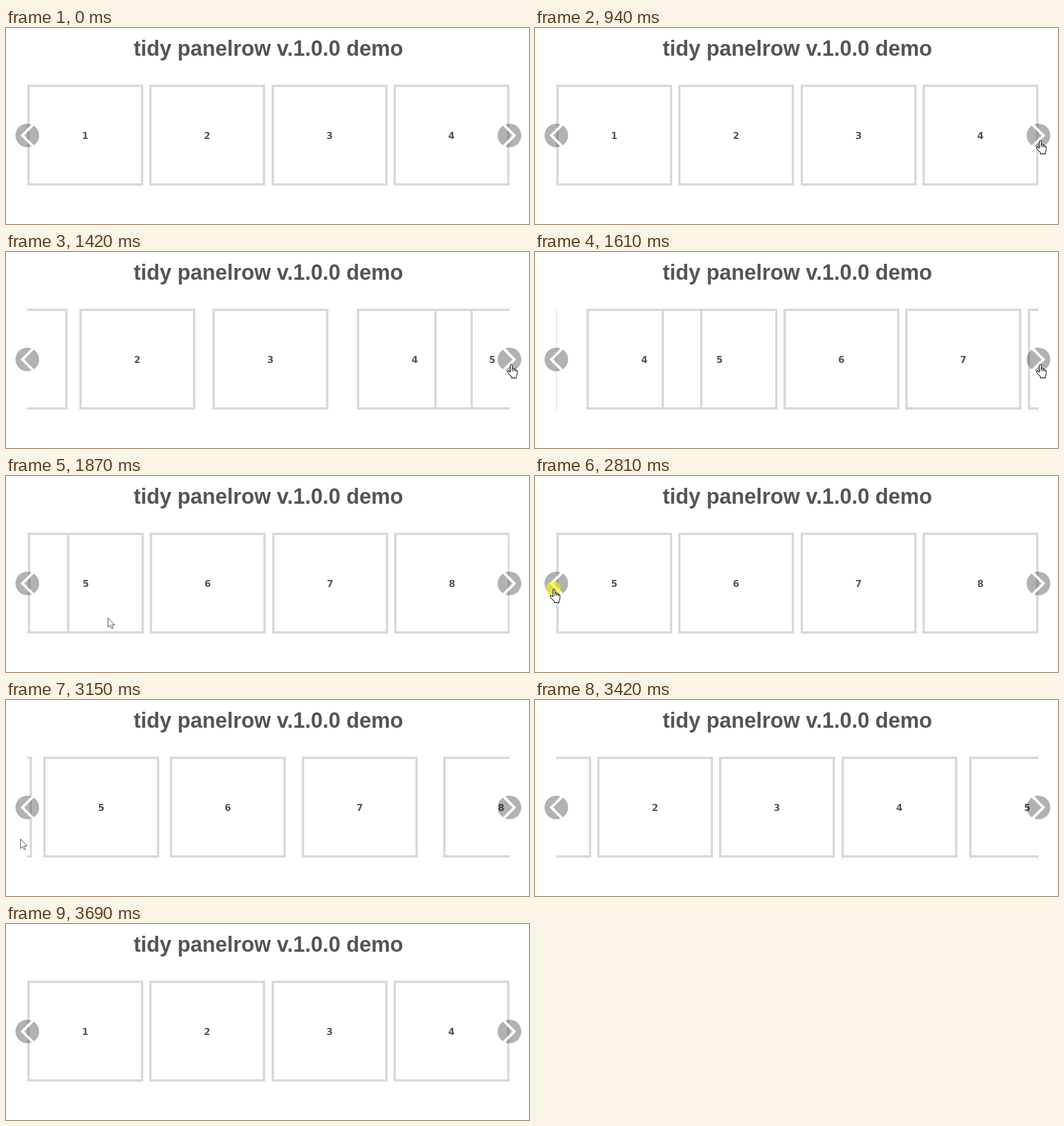
Animation, 884 px wide and 332 px high, one loop 5610 ms. Source, as an HTML page:

```html
<!DOCTYPE html>
<html lang="en">
<head>
<meta charset="utf-8">
<title>Carousel demo</title>
<style>
  html, body { margin: 0; width: 100%; height: 100%; overflow: hidden; background: #fff; }
  svg { display: block; width: 884px; height: 332px; }
  text { fill: #555; text-anchor: middle; }
  .title { font: bold 36px "Liberation Sans", Arial, sans-serif; }
  .label { font: bold 15.5px "DejaVu Sans", Verdana, sans-serif; }
  .card rect { fill: none; stroke: #d9d9d9; stroke-width: 4; }
  .chevron { fill: none; stroke: #fff; stroke-width: 4.5; }
  .cursor { fill: #fff; stroke: #111; stroke-width: 1.1; stroke-linejoin: round; }
  #arrow { stroke: #444; stroke-width: 1; }
</style>
</head>
<body>
<svg viewBox="0 0 884 332">
  <defs>
    <clipPath id="view"><rect x="36" y="90" width="815" height="185"/></clipPath>
    <clipPath id="disc"><circle r="20.5"/></clipPath>
    <g id="button" clip-path="url(#disc)">
      <circle r="20" fill="#000" fill-opacity=".3"/>
      <path class="chevron" d="M-11.5-20L8.3 0L-11.5 20"/>
    </g>
  </defs>
  <text class="title" x="443.5" y="47">tidy panelrow v.1.0.0 demo</text>
  <g id="cards" clip-path="url(#view)"></g>
  <use href="#button" transform="translate(36 182) scale(-1 1)"/>
  <use href="#button" transform="translate(851 182)"/>
  <circle id="glow" r="12.5" fill="#ff0" fill-opacity=".55"/>
  <path id="arrow" class="cursor" d="M.5.5V16.5L4.3 13L6.8 18.6L9.2 17.6L6.8 12.2H11.8Z"/>
  <g id="hand" class="cursor">
    <path d="M-.5 13.5V2.2a1.6 1.6 0 0 1 3.2 0V8.2a1.5 1.5 0 0 1 3 .2V9.4a1.5 1.5 0 0 1 2.9.4V10.8a1.4 1.4 0 0 1 2.5.6V17l-1.5 3.4v3H1.5v-2L-2.5 17-5.2 13.5c-.8-1.6 1-2.6 2.2-1.5Z"/>
    <path d="M2.7 8V12M5.7 9V12M8.6 10V12.5" fill="none"/>
  </g>
</svg>
<script>
const LOOP = 5610, PITCH = 619 / 3, PAGE = 4 * PITCH;
const SLIDE = 555, SPREAD = 400;
// The picture advances in bursts: first tick, last tick, number of ticks.
const BURSTS = [[460, 940, 8], [1080, 1420, 6], [1480, 1610, 3], [1670, 1870, 4],
                [1940, 2210, 5], [2810, 2810, 1], [2940, 3350, 7], [3420, 3690, 5]];
const START = [827, 311], RIGHT = [853, 190], MIDDLE = [172, 240], LEFT = [31, 191], EXIT = [18, 270];

const byId = id => document.getElementById(id);
const clamp = v => Math.min(1, Math.max(0, v));
const progress = (t, from, duration) => clamp((t - from) / duration);
const show = (el, on) => el.setAttribute("visibility", on ? "visible" : "hidden");
const place = (el, [x, y]) => el.setAttribute("transform", `translate(${x} ${y})`);
const mix = (a, b, p) => a.map((v, i) => v + (b[i] - v) * p);
const easeOut = p => 1 - (1 - p) ** 2;
const smooth = p => p * p * (3 - 2 * p);

// cubic-bezier(.25, .1, .25, 1)
function ease(x) {
  const curve = (a, b, s) => 3 * a * s * (1 - s) ** 2 + 3 * b * s * s * (1 - s) + s ** 3;
  let low = 0, high = 1;
  for (let i = 0; i < 24; i++) {
    const mid = (low + high) / 2;
    if (curve(.25, .25, mid) < x) low = mid; else high = mid;
  }
  return curve(.1, 1, high);
}

const cards = Array.from({ length: 8 }, (_, i) => {
  const card = document.createElementNS("http://www.w3.org/2000/svg", "g");
  card.setAttribute("class", "card");
  card.innerHTML = `<rect x="2" y="98" width="192" height="167"/><text class="label" x="98" y="188">${i + 1}</text>`;
  byId("cards").append(card);
  return card;
});

function tickAt(t) {
  let tick = 0;
  for (const [first, last, count] of BURSTS) {
    if (t < first) break;
    const step = count > 1 ? (last - first) / (count - 1) : 1;
    const index = Math.min(count - 1, Math.floor((t - first) / step + .001));
    tick = first + index * step;
  }
  return tick;
}

function drawCards(t) {
  const scroll = PAGE * (ease(progress(t, 1342, SLIDE)) - ease(progress(t, 3124, SLIDE)));
  const spread = [t < 2500 ? ease(progress(t, 1140, SPREAD)) : 0,
                  ease(progress(t, 2940, SPREAD))];
  cards.forEach((card, i) => {
    const lag = 10 * 2 ** (i % 4) * spread[i >> 2];
    place(card, [Math.round(36 + PITCH * i - scroll + lag), 0]);
  });
}

function pointerAt(t) {
  if (t < 1000) {
    const p = easeOut(progress(t, 460, 480)), bend = [826, 225];
    return mix(mix(START, bend, p), mix(bend, RIGHT, p), p);
  }
  if (t < 1870) return mix(RIGHT, MIDDLE, smooth(progress(t, 1610, 260)));
  if (t < 2940) return mix(MIDDLE, LEFT, easeOut(progress(t, 1870, 330)));
  return mix(LEFT, EXIT, smooth(progress(t, 3000, 270)));
}

function drawPointer(t) {
  const at = pointerAt(t).map(Math.round);
  const visible = t >= 460 && t < 3340;
  const hover = [36, 851].some(x => Math.hypot(at[0] - x, at[1] - 182) < 20);
  const pressed = t >= 1080 && t < 1140 || t >= 2810 && t < 2940;
  for (const id of ["arrow", "hand", "glow"]) place(byId(id), at);
  show(byId("arrow"), visible && !hover);
  show(byId("hand"), visible && hover);
  show(byId("glow"), pressed);
}

const origin = performance.now();
function render() {
  const t = tickAt((performance.now() - origin) % LOOP);
  drawCards(t);
  drawPointer(t);
  requestAnimationFrame(render);
}
render();
</script>
</body>
</html>
```
